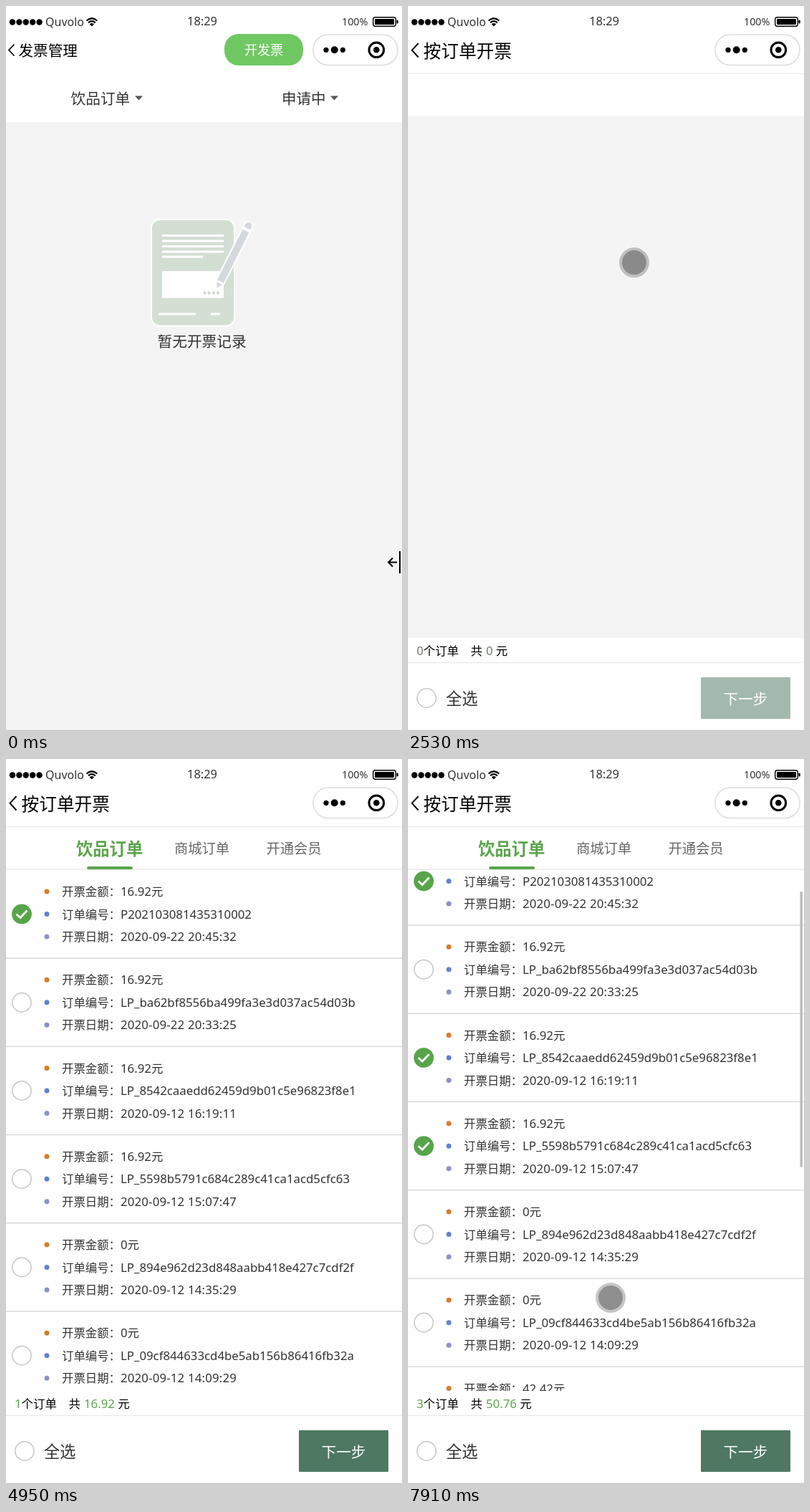
An HTML page that plays this animation: 553 by 1012 pixels, repeating every 7990 ms.

```html
<!DOCTYPE html>
<html lang="zh-CN">
<head>
<meta charset="utf-8">
<style>
html, body { margin: 0; width: 100%; height: 100%; overflow: hidden; background: #fff; }
svg { display: block; width: 553px; height: 1012px; font-family: "Noto Sans", "Noto Sans CJK SC", sans-serif; }
</style>
</head>
<body>
<svg id="stage" viewBox="0 0 553 1012"></svg>
<script>
const LOOP = 7990, PITCH = 123.25, GREEN = '#5ba54d';
const stage = document.getElementById('stage');

const text = (x, y, size, str, fill = '#333', extra = '') =>
  `<text x="${x}" y="${y}" font-size="${size}" fill="${fill}" ${extra}>${str}</text>`;
const rect = (x, y, w, h, fill, rx = 0, extra = '') =>
  `<rect x="${x}" y="${y}" width="${w}" height="${h}" rx="${rx}" fill="${fill}" ${extra}/>`;
const dot = (x, y, r, fill = '#000', extra = '') =>
  `<circle cx="${x}" cy="${y}" r="${r}" fill="${fill}" ${extra}/>`;
const path = (d, stroke, width, fill = 'none') =>
  `<path d="${d}" stroke="${stroke}" stroke-width="${width}" fill="${fill}"/>`;
const radio = (x, y) => dot(x, y, 13.2, '#fff', 'stroke="#c6c6c6" stroke-width="1.5"');

const statusBar =
  [9, 18.4, 27.8, 37.2, 46.6].map(x => dot(x, 22.5, 4.2)).join('') +
  text(55, 27.5, 16, 'Quvolo') +
  path('M112.5 20.5Q119.8 14 127.2 20.5M115 23.3Q119.8 19 124.7 23.3', '#000', 2.2) +
  path('M116.6 25.2Q119.8 22.6 123 25.2L119.8 28.6Z', 'none', 0, '#000') +
  text(253, 27.3, 16.4, '18:29') + text(469, 27.3, 14.3, '100%') +
  rect(512.7, 15.7, 31.6, 12.6, '#fff', 3, 'stroke="#000" stroke-width="1.4"') +
  rect(515, 18, 27, 8, '#000', 1) + rect(545.5, 19.5, 2.2, 5, '#000', 1) +
  rect(429, 40, 118, 42.5, '#fff', 21, 'stroke="#dcdcdc" stroke-width="1.5"') +
  dot(447, 61.3, 3.6) + dot(458.7, 61.3, 5) + dot(470.3, 61.3, 3.6) +
  dot(517.3, 61.3, 10.3, '#fff', 'stroke="#000" stroke-width="3"') + dot(517.3, 61.3, 4.3);

const bottomEdge = rect(0, 1010.7, 553, 1.3, '#c4c4c4');

const pencil = `<g transform="translate(293.5 396) rotate(26.8)" fill="#d5d9de" stroke="#fff" stroke-width="2">
  <path d="M-5.5 -11H5.5L0 0Z"/><path d="M-6 -93H6V-12H-6Z"/><path d="M-6 -95V-99Q-5 -106 0 -106T6 -99V-95Z"/></g>`;

const emptyPage = rect(0, 0, 553, 1012, '#fff') + rect(0, 162, 553, 850, '#f4f4f4') + statusBar +
  path('M11.5 53.5L4 61.5L11.5 69.5', '#000', 1.7) + text(17.5, 69.6, 20.6, '发票管理', '#000') +
  rect(305, 39, 110, 44, '#70c862', 20) + text(360, 68.4, 18, '开发票', '#fff', 'text-anchor="middle"') +
  text(90.5, 136.5, 20.7, '饮品订单') + path('M180 125.5H191L185.5 131.5Z', 'none', 0, '#555') +
  text(385, 136.5, 20.5, '申请中') + path('M453 125.5H464L458.5 131.5Z', 'none', 0, '#555') +
  rect(203, 298, 116, 148.5, '#d4dfd3', 12, 'stroke="#fff" stroke-width="2"') +
  [320.5, 328, 335.5, 343, 350].map((y, i) => rect(218, y - 1.5, i < 4 ? 86 : 57, 3, '#fff')).join('') +
  rect(218, 370, 86, 37.5, '#fff') +
  [0, 1, 2, 3].map(i => rect(275.5 + i * 6.2, 398.5, 4, 4, '#d0d9d0', 1)).join('') +
  rect(213, 428.5, 52, 3, '#fff') + rect(286, 428.5, 13, 3, '#fff') + pencil +
  text(211.5, 475.6, 20.7, '暂无开票记录') + bottomEdge;

const orders = [
  ['16.92', 'P202103081435310002', '2020-09-22 20:45:32'],
  ['16.92', 'LP_ba62bf8556ba499fa3e3d037ac54d03b', '2020-09-22 20:33:25'],
  ['16.92', 'LP_8542caaedd62459d9b01c5e96823f8e1', '2020-09-12 16:19:11'],
  ['16.92', 'LP_5598b5791c684c289c41ca1acd5cfc63', '2020-09-12 15:07:47'],
  ['0', 'LP_894e962d23d848aabb418e427c7cdf2f', '2020-09-12 14:35:29'],
  ['0', 'LP_09cf844633cd4be5ab156b86416fb32a', '2020-09-12 14:09:29'],
  ['42.42', '', '']
];
const labels = ['开票金额：', '订单编号：', '开票日期：'];
const bullets = ['#d97c26', '#5f82d2', '#8c90ca'];

const orderRow = (order, i) => `<g transform="translate(0 ${i * PITCH})">` +
  radio(22, 216.5) +
  `<g class="check" visibility="hidden">${dot(22, 216.5, 13.8, '#56a549')}${path('M14.5 216.5L20 221.5L29.5 211.5', '#fff', 2.8)}</g>` +
  labels.map((label, k) => {
    const y = 185 + k * 31.5;
    return dot(57, y, 3.5, bullets[k]) + text(78, y + 6.2, 16.4, label) +
      text(160, y + 6.2, 16.8, order[k] + (k ? '' : '<tspan font-size="16.4">元</tspan>'), '#333', k == 2 ? 'letter-spacing=".18"' : '');
  }).join('') + rect(0, 277.3, 553, 1.4, '#d9d9d9') + '</g>';

const orderPage = rect(0, 0, 553, 1012, '#fff') + rect(0, 153, 553, 729, '#f4f4f4') +
  `<g id="loaded">${rect(0, 153, 553, 729, '#fefefe')}<g id="list">${orders.map(orderRow).join('')}</g>` +
  rect(547.5, 160, 3.5, 385, '#bcbcbc', 1.5, 'id="thumb"') + '</g>' +
  rect(0, 0, 553, 153.5, '#fff') + statusBar + rect(0, 94, 553, 1, '#ececec') +
  path('M14.5 52L5.5 61.7L14.5 71.5', '#000', 1.9) + text(21.5, 71.8, 24.7, '按订单开票', '#000') +
  '<g id="tabs">' + rect(0, 153.5, 553, 1.2, '#e6e6e6') +
  text(98, 133.6, 23.3, '饮品订单', GREEN, 'font-weight="bold"') +
  text(235, 132, 19.3, '商城订单', '#666') + text(363.5, 132, 19.3, '开通会员', '#666') +
  rect(113, 150, 64, 4, GREEN, 2, 'id="underline"') + '</g>' +
  rect(0, 882, 553, 130, '#fff') +
  text(12, 906, 16.8, '<tspan class="sum" id="count"></tspan><tspan fill="#000" font-size="16.4">个订单</tspan>') +
  text(87.5, 906, 16.4, '共', '#000') +
  text(109, 906, 16.8, '<tspan class="sum" id="total"></tspan><tspan fill="#000" font-size="16.4"> 元</tspan>') +
  rect(0, 916, 553, 1.2, '#e8e8e8') + radio(26, 966) + text(53, 975, 22.2, '全选') +
  rect(409, 937, 125, 58, '#a4b9ad', 1, 'id="next"') +
  text(471.5, 974.6, 20.6, '下一步', '#fff', 'text-anchor="middle"') + bottomEdge;

stage.innerHTML = emptyPage + `<g id="orders">${orderPage}</g>` +
  `<g id="edge">${rect(549, 761, 2, 31, '#000')}${path('M546 776.5H534M540 770.5L534 776.5L540 782.5', '#000', 2)}</g>` +
  `<g id="touch">${dot(0, 0, 21, '#000', 'opacity=".22"')}${dot(0, 0, 17, '#000', 'opacity=".28"')}</g>`;

// time, x, y of the touch pointer
const touchPath = [
  [70, 528, 690], [300, 440, 250], [460, 406, 123], [660, 406, 123], [830, 370, 82], [1040, 365, 64],
  [1480, 365, 64], [1530, 381, 104], [1880, 381, 104], [1970, 381, 91], [2140, 378, 110],
  [2530, 316, 358], [2930, 274, 376], [2990, 255, 381], [3500, 255, 381], [3850, 111, 284],
  [3970, 98, 276], [4320, 19, 225], [4720, 19, 225], [4800, -40, 225], [5150, -40, 479],
  [5230, 10, 479], [5320, 16, 479], [5490, 16, 479], [5600, -40, 490], [5780, -40, 570],
  [5860, 29, 590], [6230, 29, 590], [6670, 304, 934], [6780, 304, 934], [7200, 218, 908],
  [7370, 184, 870], [7580, 285, 767], [7640, 285, 767], [7670, 285, 752], [7830, 283, 752]
];
const checkTimes = { 0: 4720, 2: 5490, 3: 6150 };

const clamp = v => Math.max(0, Math.min(1, v));
const progress = (t, from, to) => clamp((t - from) / (to - from));
const mix = (a, b, p) => `rgb(${a.map((v, i) => Math.round(v + (b[i] - v) * p))})`;
const byId = id => document.getElementById(id);
const show = (el, on) => el.setAttribute('visibility', on ? 'inherit' : 'hidden');
const checks = [...document.querySelectorAll('.check')];
const sums = document.querySelectorAll('.sum');

function touchAt(t) {
  const i = touchPath.findIndex(k => k[0] > t);
  if (i < 0) return touchPath[touchPath.length - 1].slice(1);
  if (!i) return [-99, -99];
  const [a, b] = [touchPath[i - 1], touchPath[i]], p = progress(t, a[0], b[0]);
  return [a[1] + (b[1] - a[1]) * p, a[2] + (b[2] - a[2]) * p];
}

function draw(t) {
  show(byId('edge'), t < 70);
  byId('touch').setAttribute('transform', `translate(${touchAt(t)})`);

  show(byId('orders'), t >= 2140);
  const slide = 553 * (1 - progress(t, 2100, 2400)) ** 3;
  byId('orders').setAttribute('transform', `translate(${slide} 0)`);

  for (const id of ['loaded', 'tabs']) show(byId(id), t >= 3140);
  const line = progress(t, 3230, 3530);
  byId('underline').setAttribute('x', 96 + 17 * line);
  byId('underline').setAttribute('fill', mix([238, 10, 36], [91, 165, 77], line));

  const scroll = 46 * progress(t, 7750, 7910);
  byId('list').setAttribute('transform', `translate(0 ${-scroll})`);
  byId('thumb').setAttribute('y', 160 + scroll * 0.54);
  byId('thumb').setAttribute('opacity', t < 7750 ? 1 - progress(t, 3600, 3850) : 1);

  let n = 0;
  checks.forEach((el, i) => {
    const on = t >= checkTimes[i];
    show(el, on);
    n += on;
  });
  byId('count').textContent = n;
  byId('total').textContent = n ? (n * 16.92).toFixed(2) : '0';
  sums.forEach(el => el.setAttribute('fill', n ? GREEN : '#6d7f64'));
  byId('next').setAttribute('fill', n ? '#4e7862' : '#a4b9ad');
}

function tick(now) {
  draw(now % LOOP);
  requestAnimationFrame(tick);
}
draw(0);
requestAnimationFrame(tick);
</script>
</body>
</html>
```
